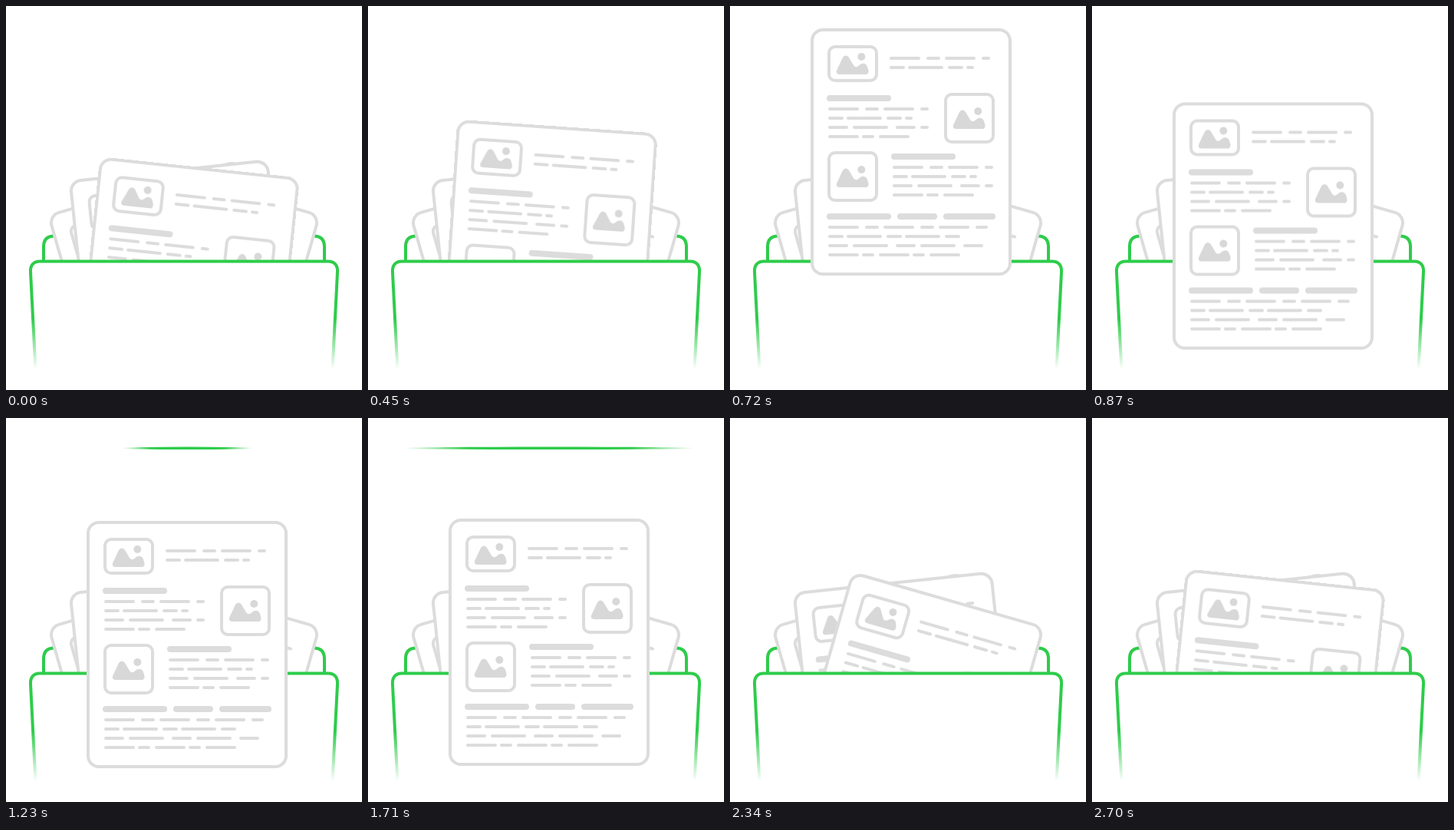
These frames come from a looping animation (464x500 px, 3000 ms). An HTML page:

```html
<!DOCTYPE html>
<html lang="en">
<head>
<meta charset="utf-8">
<title>Folder scan</title>
<style>
  html, body { margin: 0; width: 100%; height: 100%; overflow: hidden; background: #fff; }
  svg { display: block; width: 100%; height: 100%; }

  .ink { fill: none; stroke: #dcdcdc; stroke-width: 4; stroke-linecap: round; }
  .bar { stroke-width: 8; }
  .pic { fill: #d8d8d8; }
  .edge { fill: #fff; stroke: #2ecc4b; stroke-width: 4; }

  .tuck, .front, .cover, .beam { animation: 3s linear infinite; }
  .tuck { animation-name: tuck-move, tuck-turn, tuck-show; }
  .front { animation-name: front-move, front-show; }
  .cover { animation-name: cover-show; }
  .beam { animation-name: beam; transform-box: fill-box; transform-origin: center; }

  /* rising out of the folder, later a fresh page rising in */
  @keyframes tuck-move {
    0%, 10.2% { translate: 236px 370px; animation-timing-function: cubic-bezier(.72, 0, .32, 1); }
    21.5% { translate: 236px 166px; animation-timing-function: step-end; }
    77%, 77.67% { translate: 255px 525px; animation-timing-function: cubic-bezier(.4, 0, .4, 1); }
    89.83%, 100% { translate: 236px 370px; }
  }
  @keyframes tuck-turn {
    0%, 10.2% { rotate: 6deg; animation-timing-function: cubic-bezier(.5, 0, .53, 1); }
    21.5% { rotate: 0deg; animation-timing-function: step-end; }
    77%, 77.67% { rotate: 22deg; animation-timing-function: cubic-bezier(.4, 0, .4, 1); }
    89.83%, 100% { rotate: 6deg; }
  }
  @keyframes tuck-show {
    0% { opacity: 1; animation-timing-function: step-end; }
    21.5% { opacity: 0; animation-timing-function: step-end; }
    77%, 100% { opacity: 1; }
  }

  /* dropping in front of the folder, then up through the beam */
  @keyframes front-move {
    0%, 21.58% { translate: 236px 166px; animation-timing-function: cubic-bezier(.4, 0, .2, 1); }
    32.36%, 56.45% { translate: 236px 295px; animation-timing-function: cubic-bezier(.4, 0, .2, 1); }
    67.6%, 100% { translate: 236px -185px; }
  }
  @keyframes front-show {
    0% { opacity: 0; animation-timing-function: step-end; }
    21.5% { opacity: 1; animation-timing-function: step-end; }
    67%, 100% { opacity: 0; }
  }
  @keyframes cover-show {
    0% { opacity: 0; animation-timing-function: step-end; }
    40% { opacity: 1; animation-timing-function: step-end; }
    77%, 100% { opacity: 0; }
  }
  @keyframes beam {
    0%, 40.17% { transform: scaleX(0); animation-timing-function: cubic-bezier(.16, 1, .3, 1); }
    50%, 68.17% { transform: scaleX(1); animation-timing-function: cubic-bezier(.16, 1, .3, 1); }
    78%, 100% { transform: scaleX(0); }
  }
</style>
</head>
<body>
<svg viewBox="0 0 464 500">
  <defs>
    <linearGradient id="fade" gradientUnits="userSpaceOnUse" x1="0" y1="408" x2="0" y2="473">
      <stop offset="0" stop-color="#2ecc4b"/>
      <stop offset="1" stop-color="#2ecc4b" stop-opacity="0"/>
    </linearGradient>
    <linearGradient id="glow">
      <stop offset="0" stop-color="#2ecc4b" stop-opacity="0"/>
      <stop offset=".22" stop-color="#2ecc4b"/>
      <stop offset=".78" stop-color="#2ecc4b"/>
      <stop offset="1" stop-color="#2ecc4b" stop-opacity="0"/>
    </linearGradient>
    <clipPath id="above"><rect width="464" height="332"/></clipPath>

    <g id="photo" class="pic">
      <path d="M143 89C139 89 138 86 139.500 83L147 67C149 63.500 153 63.500 155 67L161 77C163 80 166 79.500 168 77.500C171 74 177 73 179 79L180.500 84C181 87 179 89 177 89Z"/>
      <circle cx="171.300" cy="66" r="5"/>
    </g>

    <path id="intro" class="ink" d="M130 134h36M178 134h14M202 134h36M250 134h7
      M130 146h16M154 146h42M206 146h16M230 146h6"/>
    <g id="para">
      <path class="ink bar" d="M130 120h76"/>
      <use href="#intro"/>
      <path class="ink" d="M130 158h22M162 158h42M218 158h22M250 158h7
        M130 170h36M174 170h12M196 170h36"/>
    </g>

    <!-- page, centred on its own origin -->
    <g id="page">
      <g transform="translate(-236 -190)">
        <rect class="ink" style="fill:#fff" x="107" y="31" width="258" height="318" rx="14"/>
        <rect class="ink" x="129" y="53" width="62" height="44" rx="8"/>
        <rect class="ink" x="281" y="115" width="62" height="62" rx="8"/>
        <rect class="ink" x="129" y="191" width="62" height="62" rx="8"/>
        <use href="#photo"/>
        <use href="#photo" x="152" y="71"/>
        <use href="#photo" y="147"/>
        <use href="#intro" x="80" y="-66"/>
        <use href="#para"/>
        <use href="#para" x="84" y="76"/>
        <path class="ink bar" d="M130 274h76M222 274h44M282 274h60"/>
        <path class="ink" d="M130 288h36M178 288h14M202 288h36M250 288h14M274 288h36M322 288h12
          M130 300h16M154 300h42M206 300h16M230 300h42M282 300h16
          M130 312h22M162 312h42M218 312h22M250 312h42M306 312h22
          M130 324h36M174 324h12M196 324h36M240 324h12M262 324h36"/>
      </g>
    </g>
  </defs>

  <g clip-path="url(#above)">
    <path class="edge" d="M49 340V313.500Q49 299.500 63 299.500H401Q415 299.500 415 313.500V340"/>
    <use href="#page" transform="translate(223.500 390) rotate(-16)"/>
    <use href="#page" transform="translate(228.500 373) rotate(-6)"/>
    <use href="#page" transform="translate(240.500 390) rotate(16)"/>
    <g class="tuck"><use href="#page"/></g>
  </g>

  <path class="edge" style="stroke:url(#fade)"
    d="M38.500 474L32 346.500C31.400 337.500 36 332.500 44 332.500H420C428 332.500 432.600 337.500 432 346.500L425.500 474"/>

  <g class="front"><use href="#page"/></g>
  <rect class="cover" width="464" height="40.500" fill="#fff"/>
  <ellipse class="beam" cx="236.500" cy="39.300" rx="190.500" ry="1.800" fill="url(#glow)"/>
</svg>
</body>
</html>
```
